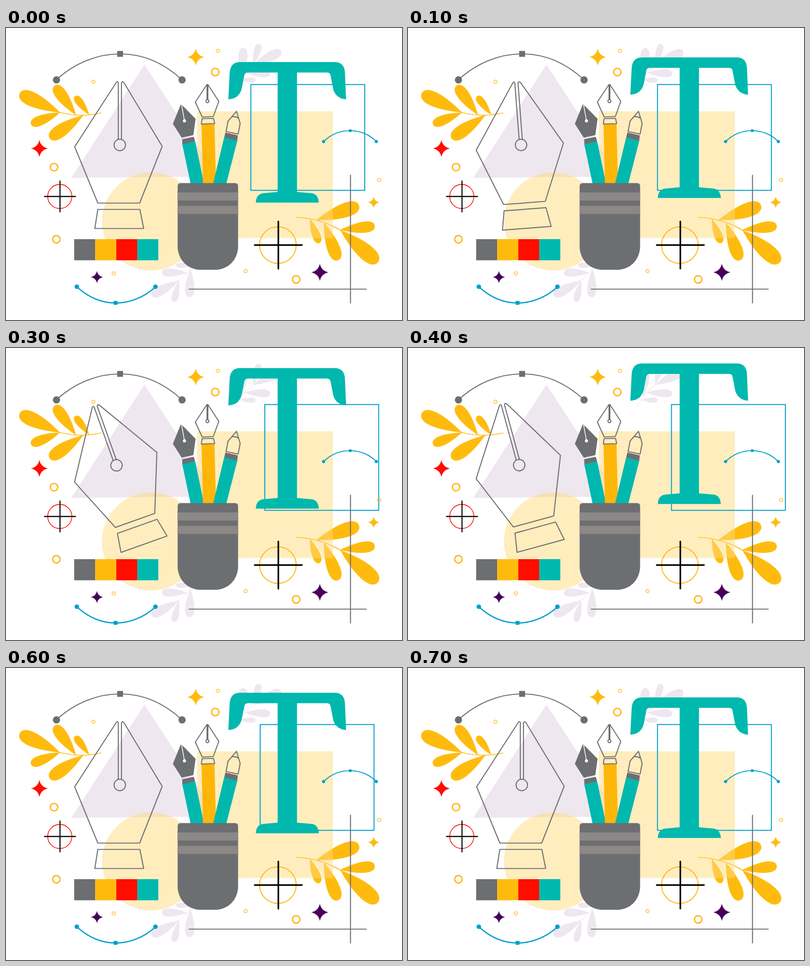
Animation of 871x643 px, one loop 0.8 s. Source, as an HTML page:

```html
<!DOCTYPE html>
<html lang="en">
<head>
<meta charset="utf-8">
<title>Design tools</title>
<style>
html, body { margin: 0; width: 100%; height: 100%; overflow: hidden; background: #fff; }
svg { display: block; width: 100%; height: 100%; }
.line { fill: none; stroke: #6d6e71; stroke-width: 2.2; stroke-linejoin: round; stroke-linecap: round; }
.gray { fill: #6d6e71; }
.teal { fill: #00b8ae; }
.gold { fill: #ffbb0d; color: #ffbb0d; }
.red { fill: #ff0d00; }
.plum { fill: #46005b; }
.blue { fill: #009fcb; }
.lilac { fill: #eee7f0; color: #eee7f0; }
.tint { fill: #ffdb7f; opacity: .5; }
.stem { fill: none; stroke: currentColor; stroke-width: 1.7; stroke-linecap: round; }
.ring { fill: none; stroke: #ffb819; }
.arc { fill: none; stroke: #009fcb; }
.cross { stroke: #000; stroke-linecap: round; }
</style>
</head>
<body>
<svg viewBox="0 0 871 643">
  <defs>
    <path id="leaf" d="M0 0C.25-.09 .5-.16 .72-.16C.9-.16 1-.1 1 0C1 .1 .9 .16 .72 .16C.5 .16 .25 .09 0 0Z"/>
    <g id="sprig"><path class="stem" d="M0 0Q-46 11-92-1.500"/></g>
  </defs>

  <g class="lilac">
    <use href="#sprig" transform="translate(504 130) rotate(128.500) scale(.697)"/>
    <use href="#sprig" transform="translate(419 506) rotate(-53.500) scale(.7)"/>
    <path d="M304.500 80.500L143.500 330L465 327Z"/>
  </g>
  <g class="gold">
    <use href="#sprig" transform="translate(209 187)"/>
    <use href="#sprig" transform="translate(639 417) rotate(195.500) scale(1.110)"/>
  </g>
  <circle class="tint" cx="319" cy="426" r="108"/>
  <rect class="tint" x="420" y="183.500" width="299" height="279"/>

  <rect id="frame" class="arc" x="538.500" y="124.500" width="250.500" height="233" stroke-width="2.100"/>
  <path id="letter" class="teal" d="M489 157L492 98Q494 75 515 75H723Q744 75 745.500 98L748 157C731 156 721 145 719 131L714 105Q713 98 706 98H640V361L674 364Q687 367 688 384.500H549.500Q550 367 564 364L597.500 361V98H532Q525 98 524 105L519 131C516 146 507 156 489 157Z"/>

  <g id="pen" class="line">
    <path d="M247 245.500V121Q246.500 116 242.500 120L151 261.500L202 385.500H294L343.500 260.500L259.500 120.500Q255.500 116 254 121V245.500"/>
    <circle cx="250.300" cy="257.500" r="12.600"/>
    <path d="M202 399.500H294.500L302.800 441.500H195.300Z"/>
  </g>

  <path class="line" d="M111 114C152 76 203 57 251 57S346 76 387 114"/>
  <g class="gray">
    <circle cx="111" cy="114.300" r="8"/>
    <circle cx="387.300" cy="114.300" r="8"/>
    <path d="M244.500 50.500h13v13h-13z"/>
  </g>
  <path class="arc" stroke-width="2.700" d="M156 570C182 594 211 605.500 241 605.500S303 594 329 570"/>
  <path class="arc" stroke-width="2" d="M698.500 250C715 234 736 226 757 226S799 234 814.500 250"/>
  <g class="blue">
    <circle cx="155.800" cy="569.800" r="5"/>
    <circle cx="328.700" cy="569.800" r="5"/>
    <path d="M236.700 601h8.600v8.600h-8.600zM754.200 223.200h5.800v5.800h-5.800z"/>
    <circle cx="698.500" cy="250" r="3.500"/>
    <circle cx="814.500" cy="250" r="3.500"/>
  </g>

  <path class="teal" d="M387.500 255L416 249L433 331L434 345H406.500Z"/>
  <path fill="#ffb60a" d="M430 211.500L458.500 210.500L462 345H433V331Z"/>
  <path class="teal" d="M480 240L509 247L484 345H455Z"/>
  <path class="gray" d="M384.500 168L367 211L386.500 241.500L412 236L417 200L387.500 170ZM387.500 245L413 239.500L416 249.500L388 256ZM482.500 230L510 236.500L508.500 248L480 241Z"/>
  <path d="M386 168L392.500 204" stroke="#fff" stroke-width="1.600"/>
  <circle cx="392.500" cy="204.500" r="3.400" fill="#fff"/>
  <g class="line">
    <path d="M442 124.500L416.500 163L431.500 196L456 195L468 161.500L444 124.500M442.200 125V157M444 125V157M431.500 199.500L456.500 199L459 210.500L429.500 211.500Z"/>
    <circle cx="443" cy="161" r="3.400"/>
    <path d="M507 183.500L488.500 205L484 228L510.500 233.500L515 210ZM497 195.500Q505 194 511 198.500"/>
  </g>
  <path class="gray" d="M384.500 341.500H503.500Q510.500 341.500 510.500 348.500V480C510.500 510 489 532.500 459 532.500H429C399 532.500 377.500 510 377.500 480V348.500Q377.500 341.500 384.500 341.500Z"/>
  <path fill="#8b8886" d="M377.500 362h133v18h-133zM377.500 391.500h133v18h-133z"/>

  <g id="swatches"></g>

  <circle cx="118.300" cy="371" r="26.600" fill="none" stroke="#ff0d00" stroke-width="1.600"/>
  <path class="cross" stroke-width="2.300" d="M84.500 371H153M118.800 337V405"/>
  <circle class="ring" cx="598" cy="478" r="40.300" stroke-width="2.100"/>
  <path class="cross" stroke-width="3.500" d="M547 478H651M599 426V530"/>
  <path class="line" d="M403 575H792.500M757.700 324V605.500"/>
  <g id="sparks"></g>
</svg>
<script>
const $ = id => document.getElementById(id);

function add(parent, tag, attrs) {
  const el = document.createElementNS("http://www.w3.org/2000/svg", tag);
  for (const k in attrs) el.setAttribute(k, attrs[k]);
  $(parent).append(el);
}

// A leaf grows from the sprig's curved stem at x to the tip (tx, ty)
function leaf(x, tx, ty) {
  const y = -x * (x + 86) / 360;
  const angle = Math.atan2(ty - y, tx - x) * 180 / Math.PI;
  add("sprig", "use", {
    href: "#leaf",
    transform: `translate(${x} ${y}) rotate(${angle}) scale(${Math.hypot(tx - x, ty - y)})`
  });
}

function star(cls, x, y, r) {
  const a = r * .17;
  add("sparks", "path", {
    class: cls,
    d: `M0 ${-r}Q${a} ${-a} ${r} 0Q${a} ${a} 0 ${r}Q${-a} ${a} ${-r} 0Q${-a} ${-a} 0 ${-r}Z`,
    transform: `translate(${x} ${y})`
  });
}

const ring = (cx, cy, r) =>
  add("sparks", "circle", { class: "ring", cx, cy, r, "stroke-width": r * .33 + .3 });

leaf(-90, -179, -43);
leaf(-90, -154, 25);
leaf(-55, -102, -60);
leaf(-39, -113, 56);
leaf(-26, -57, -37);

["gray", "gold", "red", "teal"].forEach((cls, i) =>
  add("swatches", "rect", { class: cls, x: 150 + i * 46.25, y: 465, width: 46.25, height: 46.5 }));

star("gold", 417.3, 64, 18.8);
star("red", 73.5, 265.3, 18.8);
star("gold", 808.7, 384, 12.5);
star("plum", 200, 548.5, 13.3);
star("plum", 690.3, 538, 19);

ring(192.3, 118.3, 3.6);
ring(466.3, 50.3, 3.6);
ring(237, 540.3, 3.6);
ring(527, 535.3, 3.6);
ring(820.8, 334.5, 3.6);
ring(460.3, 97, 8.2);
ring(105.7, 306.4, 8.2);
ring(110.8, 465.2, 8.2);
ring(638.2, 553.6, 8.2);

const ease = p => p * p * (2.5 - 1.5 * p);

// The pen tilts for three steps and returns in three; the rest slides four steps each way
function draw(now) {
  const step = Math.floor(now / 100) % 8;
  const shift = 10.25 * (4 - Math.abs(4 - step));
  const swing = step < 3 ? ease(step / 3) : 1 - ease(Math.min(1, (step - 3) / 3));
  $("frame").setAttribute("transform", `translate(${shift} 0)`);
  $("letter").setAttribute("transform", `translate(0 ${-shift})`);
  $("pen").setAttribute("transform", `rotate(${-19.6 * swing} 249 279)`);
  requestAnimationFrame(draw);
}
draw(0);
</script>
</body>
</html>
```
